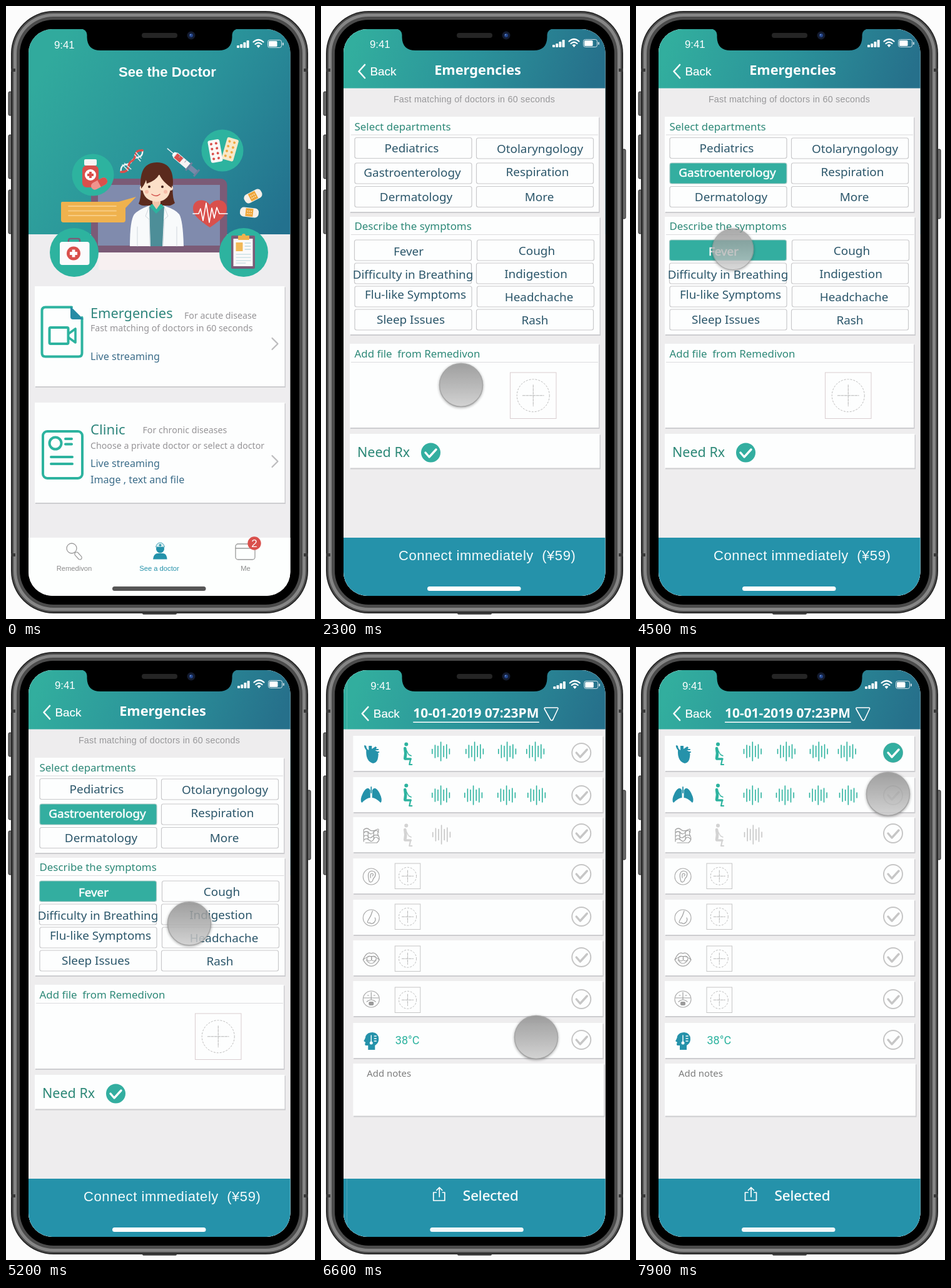
Recreate the animation shown at these times as an HTML page. Size 494x980 px, loop 8000 ms.

```html
<!DOCTYPE html>
<html lang="en">
<head>
<meta charset="utf-8">
<title>See the Doctor</title>
<style>
html, body { margin: 0; width: 100%; height: 100%; overflow: hidden; background: #fcfcfc; }
svg { display: block; width: 494px; height: 980px; }
text { font-family: "Noto Sans", "Open Sans", sans-serif; }
.ar { font-family: "Liberation Sans", Arial, sans-serif; }
.ro { font-family: Roboto, sans-serif; }
.on rect { fill: #33aea0; stroke: #a9c9c5; }
.on text { fill: #fff; stroke: #fff; stroke-width: .5; }
</style>
</head>
<body>
<svg id="stage" viewBox="0 0 494 980"></svg>
<script>
const TEAL = '#2db39f', BLUE = '#2592aa', RED = '#d9504c', PURPLE = '#7b5b77', GREY = '#c6c6c6';

// Markup helpers
const rect = (x, y, w, h, fill, rx = 0, more = '') =>
  `<rect x="${x}" y="${y}" width="${w}" height="${h}" rx="${rx}" fill="${fill}" ${more}/>`;
const circle = (x, y, r, fill, more = '') => `<circle cx="${x}" cy="${y}" r="${r}" fill="${fill}" ${more}/>`;
const shape = (d, fill, more = '') => `<path d="${d}" fill="${fill}" ${more}/>`;
const line = (d, color, width = 1, more = '') =>
  `<path d="${d}" fill="none" stroke="${color}" stroke-width="${width}" stroke-linecap="round" stroke-linejoin="round" ${more}/>`;
const text = (x, y, size, fill, str, more = '') =>
  `<text x="${x}" y="${y}" font-size="${size}" fill="${fill}" ${more}>${str}</text>`;
const group = (body, more = '') => `<g ${more}>${body}</g>`;
const at = (x, y, body, turn = 0, size = 1) => group(body, `transform="translate(${x} ${y}) rotate(${turn}) scale(${size})"`);
const MID = 'text-anchor="middle"', BOLD = 'font-weight="700"', ARIAL = 'class="ar"';

const card = (x, y, w, h) => rect(x + 1, y + 1.5, w + .5, h + .5, '#cdcdd0') + rect(x, y, w, h, '#fdfefe');
const cross = (x, y, r, color) => line(`M${x - r} ${y}h${2 * r}M${x} ${y - r}v${2 * r}`, color, r * .8, 'style="stroke-linecap:butt"');
const home = (x, color) => rect(x, 928, 149.5, 7, color, 3.5);

function status(x, y) {
  const bars = [4, 6, 9, 12].map((h, i) => rect(292 + i * 5.2, 67 - h, 4, h, '#fff', 1)).join('');
  const wifi = line('M318.5 57.5q8-7 16 0M321.5 61q5-4.5 10 0', '#fff', 2.2) + shape('M323.5 63.5q3-2.5 6 0l-3 3.5z', '#fff');
  const battery = rect(341.5, 54.5, 22, 12, 'none', 3, 'stroke="#d4e3ea"') + rect(343, 56, 13.5, 9, '#fff', 1.5) +
    rect(365, 58.5, 1.8, 4.5, '#d4e3ea', 1);
  return at(x, y, text(0, 68, 16.8, '#fff', '9:41', ARIAL) + bars + wifi + battery);
}

const back = (x, y) => line(`M${x + 10} ${y}l-9.5 10.5l9.5 10.5`, '#fff', 2.6) +
  text(x + 18.5, y + 17, 18.9, '#fff', 'Back', ARIAL + ' stroke="#fff" stroke-width=".2"');
const tick = (x, y, color) => line(`M${x - 8} ${y}l6 7l11-12`, color, 3.4);
const addBox = (x, y, size, r, color) => rect(x, y, size, size, 'none', 0, `stroke="${color}"`) +
  at(x + size / 2, y + size / 2, circle(0, 0, r, 'none', 'stroke="#bbb" stroke-dasharray="3 2"') +
    line(`M${-r * .65} 0h${r * 1.3}M0 ${-r * .65}v${r * 1.3}`, '#b5b5b5', 1, 'stroke-dasharray="4 1.5"'));

function doctor() {
  const hair = '#5b2a1d', skin = '#fcdfc8';
  return shape('M212 316Q217 305 215 284Q215 250 241 250Q267 250 267 282Q265 304 270 315Q264 320 258 319H224Q217 320 212 316Z', hair) +
    shape('M198 384Q198 343 205 333Q211 326 229 319H252Q271 325 277 333Q283 343 284 384Z', '#f8fafb') +
    shape('M229 320L231 384H250L253 320Z', '#4d8e98') + shape('M230 321L240 332L252 321L249 317H232Z', TEAL) +
    shape('M234 306H247V316L240.5 325L234 316Z', '#f3c6ab') +
    circle(218, 291, 4, skin) + circle(263, 291, 4, skin) +
    shape('M218 270H263V292Q261 312 240 313Q220 311 218 292Z', skin) +
    shape('M216 292Q221 287 224 278L225 284Q240 279 245 269Q250 281 265 291Q268 254 241 252Q214 254 216 292Z', hair) +
    circle(229, 289, 2, '#432019') + circle(250, 289, 2, '#432019') +
    circle(225, 297, 3, '#f6bda9') + circle(255, 297, 3, '#f6bda9') +
    line('M233 301q7 5 13 0', '#d2514b', 1.5) +
    line('M229 321l-6 15l6 5l1 43M253 321l6 15l-6 5l-2 43M210 353v31M273 353v31', '#cfd6dc', 1);
}

function hero() {
  const dots = color => [0, 1, 2, 3].map(r => [0, 1].map(c => circle(c * 8 - 4, r * 8 - 12, 2, color)).join('')).join('');
  const dna = line('M-15 15C-16 0-3 8 0 0S16-1 15-15', '#f4f7f8', 2) + line('M-15 15C0 16-8 3 0 0S1-16 15-15', RED, 3) +
    line('M-13 5l8 8M-10 3l9 8M4-9l8 9M6-12l7 8', '#e8eef0', 1.2);
  const syringe = line('M-31 0h12', '#e6eef2', 1.5) + shape('M-19-3l4-2v10l-4-2z', '#fff') + rect(-15, -5.5, 28, 11, '#f7f3f4', 1) +
    rect(-14, -4.5, 12, 9, RED) + line('M-8-5v4M-2-5v4M4-5v4', '#a8a6b5') + rect(12, -8, 3, 16, '#6f7f9e') +
    rect(15, -4, 14, 8, '#7789a8') + rect(28, -7, 3, 14, '#6f7f9e');
  const plaster = rect(-15, -7.5, 30, 15, '#f6efe7', 6) + rect(-6, -6.5, 12, 13, '#efa73c') +
    [-3, 0, 3].map(x => circle(x, -2, .8, '#fff') + circle(x, 2, .8, '#fff')).join('');
  return rect(148, 365, 200, 57, '#f7f0f1') + rect(136, 276, 217.5, 118, PURPLE, 10) + rect(147, 286, 195, 97, '#808bad') + doctor() +
    shape('M90 313H180L208 305L191 323V342Q191 346 187 346H92Q88 346 88 342V315Q88 313 90 313Z', '#efb24e') +
    line('M100 320h76M100 327.5h76M100 335h76', '#f8cc82', 1.8) +
    circle(139, 270, 33.5, TEAL) + rect(122, 255, 26, 35, RED, 7) + rect(125, 245, 20, 10, '#fbf4f3', 2) +
    circle(135, 270, 9, '#fff') + cross(135, 270, 5, RED) +
    at(149, 284, rect(-14, -6, 28, 12, '#f0938d', 6) + shape('M0-6H8a6 6 0 0 1 0 12H0z', RED), -28) +
    at(201, 248, dna, 0, 1.15) + at(282, 248, syringe, 40) +
    circle(346, 231, 33.5, TEAL) + at(358, 229, rect(-9, -18, 19, 36, '#f8e8c9', 3) + dots('#f0a942'), 16) +
    at(334, 232, rect(-9, -18, 19, 36, '#fbf7f6', 3) + dots(RED), -10) +
    at(395, 304, plaster, -28) + at(389, 330, plaster, 6) +
    shape('M326 354C307 341 299 334 299 323C299 309 318 306 326 318C334 306 353 309 353 323C353 334 345 341 326 354Z', RED) +
    line('M299 332h9l3-8l4 19l5-28l5 31l4-23l4 16l4-17l4 10h13', '#fff', 1.6) +
    circle(109, 394, 39, TEAL) + line('M100 379v-4q0-3 3-3h12q3 0 3 3v4', PURPLE, 2.5) + rect(86, 377, 47.5, 37, '#fbfbfc', 4) +
    circle(108, 395.5, 11, RED) + cross(108, 395.5, 6, '#fff') +
    circle(380, 394, 39, TEAL) + rect(360, 367, 38, 53, PURPLE, 2) + rect(363.5, 372, 31, 44, '#fbfafa') +
    rect(371, 367, 18, 7, '#efb24e', 1) + circle(380, 367, 3, '#efb24e') + rect(367.5, 378, 11, 14, '#f2b957') +
    line('M382 379h9M382 384h9M382 389h9', '#9ec8d0') + line('M368 397h23M368 402h23M368 407h23M368 411h15', '#b5d5db');
}

function doctorScreen() {
  const note = (x, y, s) => text(x, y, 14.2, '#969497', s);
  const link = (y, s) => text(135, y, 16.1, '#3b6c89', s);
  const chevron = y => line(`M425.5 ${y - 9}l9 9l-9 9`, '#bcbcbe', 2.2);
  const docIcon = line('M105 481.5H63Q57.5 481.5 57.5 487V555Q57.5 560.5 63 560.5H116Q121.5 560.5 121.5 555V498', TEAL, 4) +
    shape('M103 480L124 501H107Q103 501 103 497Z', '#268ba5') +
    rect(69.5, 514, 30, 26, 'none', 2, `stroke="${TEAL}" stroke-width="4"`) + line('M100 524l11-8v22l-11-8', TEAL, 3.6);
  const listIcon = rect(59, 680, 63, 75, 'none', 7, `stroke="${TEAL}" stroke-width="4"`) +
    circle(79, 699, 9.5, 'none', `stroke="${TEAL}" stroke-width="4"`) + line('M95 692h10M95 700.5h10M72 721h34M72 732h34', TEAL, 4);
  const tabs = rect(36, 850, 420, 94, '#fdfffe') +
    circle(105, 867, 8, 'none', 'stroke="#9a9a9a" stroke-width="1.3"') +
    at(115.5, 879, rect(-7, -3, 14, 6, 'none', 3, 'stroke="#9a9a9a" stroke-width="1.2"'), 48) +
    shape('M235 884.5Q236 875 243 875H250Q257 875 257.5 884.5Z', BLUE) + circle(246.5, 868, 6.5, BLUE) +
    shape('M239.5 865Q241 858 246.5 858T253.5 865Z', '#d8eef1', `stroke="${BLUE}" stroke-width=".8"`) + cross(246.5, 862, 2, BLUE) +
    rect(367, 860, 31, 25, 'none', 4, 'stroke="#9a9a9a" stroke-width="1.3"') + line('M367 867h31', '#9a9a9a', 1.3) +
    circle(397, 859, 10.7, RED) + text(397, 865, 17, '#fff', '2', MID + ' ' + ARIAL) +
    [['Remedivon', 109, '#8b8b8b'], ['See a doctor', 245, BLUE], ['Me', 383, '#8b8b8b']]
      .map(([s, x, c]) => text(x, 903, 11.2, c, s, MID + ' ' + ARIAL)).join('') + home(170, '#565656');
  return rect(36, 37, 420, 910, '#eeedef') + rect(36, 37, 420, 328, 'url(#tall)') + status(77, 0) +
    text(258, 113, 22.1, '#fff', 'See the Doctor', `${MID} ${BOLD} ${ARIAL}`) + hero() +
    card(46, 448, 399.5, 160) + docIcon + text(135, 499, 21.8, '#2f867d', 'Emergencies') + note(285, 500, 'For acute disease') +
    note(135, 520, 'Fast matching of doctors in 60 seconds') + link(566, 'Live streaming') + chevron(540) +
    card(46, 634, 399.5, 160) + listIcon + text(135, 685, 22.2, '#2f867d', 'Clinic') + note(218.5, 683, 'For chronic diseases') +
    note(135, 708, 'Choose a private doctor or select a doctor') + link(737, 'Live streaming') +
    link(763, 'Image , text and file') + chevron(728) + tabs;
}

const chrome = () => rect(36, 37, 420, 910, '#eeedee') + rect(36, 37, 420, 94.5, 'url(#short)') + rect(36, 850, 420, 97, BLUE);

function emergencyScreen() {
  // label, button x, button y, text centre, baseline
  const options = [
    ['Pediatrics', 54, 210.5, 145, 234], ['Otolaryngology', 248.5, 211, 350, 235],
    ['Gastroenterology', 54, 251, 146, 273], ['Respiration', 248.5, 251, 346, 272],
    ['Dermatology', 54, 288.5, 152, 312], ['More', 248.5, 288.5, 349, 312],
    ['Fever', 53.5, 374, 140, 399], ['Cough', 249.5, 374, 345, 398],
    ['Difficulty in Breathing', 53.5, 411, 147, 436], ['Indigestion', 248.5, 411, 343.5, 435],
    ['Flu-like Symptoms', 54, 448, 151, 468], ['Headchache', 249.5, 448, 348.5, 472],
    ['Sleep Issues', 54, 485, 143.5, 508], ['Rash', 248.5, 485, 342, 509]];
  const buttons = options.map(([s, x, y, cx, base]) => group(
    rect(x, y, 187, 33, '#fdfefe', 3, 'stroke="#c9c9cb" stroke-width="1.2"') + text(cx, base, 18.9, '#2b566a', s, MID),
    `id="${s.split(' ')[0]}"`)).join('');
  const section = (y, w, h, base, s, rule) => card(46, y, w, h) + text(53.5, base, 16.9, '#2c8877', s) + rect(48, rule, w - 3, 1, '#dcdcde');
  return chrome() + status(78, -1) + back(60, 94) + text(250.5, 110, 21.8, '#fff', 'Emergencies', `${MID} ${BOLD}`) +
    text(245, 154, 14.3, '#979799', 'Fast matching of doctors in 60 seconds', `${MID} ${ARIAL} letter-spacing=".25"`) +
    section(177, 398, 152, 199, 'Select departments', 205.5) + section(337, 399.5, 188, 358, 'Describe the symptoms', 365) + buttons +
    section(540, 398, 134, 562, 'Add file&nbsp; from Remedivon', 569) + addBox(302.5, 586, 73.5, 26, '#d9cdd0') +
    card(46, 684, 399.5, 54.5) + text(58, 721, 21.5, '#2c8877', 'Need Rx') + circle(175.5, 714, 15.5, '#33aea0') + tick(175, 714, '#fff') +
    text(124, 886, 22, '#f4fbfc', 'Connect immediately&nbsp; (¥59)', `${ARIAL} letter-spacing=".55"`) + home(170, '#fff');
}

function recordScreen() {
  const tops = [142, 208, 272, 338, 404, 469, 534, 601], checks = [169, 237, 298, 363, 431, 496, 563, 628];
  const wave = (x, y, color) => [7, 20, 17, 30, 17, 22, 8].map((h, i) => line(`M${x - 13.5 + i * 4.6} ${y - h / 2}v${h}`, color, 1.6)).join('');
  const sitter = (y, color) => at(132, y, circle(-1, -14.5, 3, color) + line('M-3-8Q-1 0-3 8', color, 4.6) + line('M-3 9H6', color, 3.4) +
    line('M6 9L4 18H8', color, 2.2) + line('M-2-7L3 2L7 4', color, 1.4));
  const ring = circle(0, 0, 13, 'none', 'stroke="#a5a5a5" stroke-width="1.1"'), ink = d => line(d, '#a0a0a0', 1.2);
  const lung = shape('M-1.5-8V4Q-7 4-15 12Q-19 8-13-4Q-6-16-1.5-8Z', BLUE);
  const icons = [
    shape('M-8-6Q-12-11-11-14L-8-13Q-8-8-4-6V-13H1V-8L7-12L9-10L6-6Q13-4 11 5Q10 14 3 15Q-9 12-8-6Z', BLUE) + line('M5-7h6M6-3h6', BLUE, 2),
    lung + group(lung, 'transform="scale(-1 1)"') + line('M0-13V-4', BLUE, 1.8),
    ink('M-12-9q5-4 9 0t14-1M-12-4q4-4 8 0t8-1t8 0M-12 2q4-4 7 0t7 0t10-1M-11 7q4-3 8 1t7-2t8 0M-9 12h17M-12-9v19M12-9q-3 6 0 11t-3 10M-5-6v13M4-7v14'),
    ring + ink('M-3 8Q-8-8 1-9Q9-8 6 0Q3 3 2 7Q0 10-3 8M-1 2Q-2-5 1-5Q5-4 2-1'),
    ring + ink('M2-11Q0-3-5 4Q-8 9-2 8Q1 11 5 7Q8 3 6 0'),
    ink('M-13 2Q-7-12 0-8Q7-12 13 2Q7 13 0 12Q-7 13-13 2ZM-13 2Q0-9 13 2M-8 2Q0 14 8 2') + circle(-3, 0, 4, 'none', 'stroke="#a0a0a0"') + circle(4, 0, 4, 'none', 'stroke="#a0a0a0"'),
    ring + ink('M-12-2H12M-7 4Q0-2 7 4M0-11V0M-6-6h2M4-6h2') + rect(-4, 4, 8, 6, '#9b9b9b', 2),
    shape('M-5 14V7H-9Q-11 6-9 2L-12 0Q-9-5-9-8Q-6-14 2-14Q12-13 12-3Q12 3 6 7V14Z', BLUE) + line('M0-9V2M5-8h3M5-4h3M5 0h3', '#fff', 1.4) + circle(0, 3, 2.5, '#fff')];
  const rows = tops.map((y, i) => card(46, y, 399, 56) + at(75, y + 29, icons[i]) +
    group(circle(411, checks[i], 15, 'none', `stroke="${GREY}" stroke-width="2"`) + tick(411, checks[i], GREY))).join('');
  const boxes = [346, 411, 478, 544].map(y => addBox(113, y, 40.5, 14, GREY)).join('');
  return chrome() + status(74, 0) + back(60, 96) + text(142, 113, 20.9, '#fff', '10-01-2019 07:23PM', BOLD) + rect(142, 119.5, 201.5, 1.5, '#fff') +
    line('M353 97h19q2 0 1.5 2l-8 17q-2 3-4 0l-9.5-17q-.5-2 1-2z', '#fff', 1.6) + rows + boxes + card(46, 666, 401, 83.5) +
    sitter(170, TEAL) + sitter(236, TEAL) + sitter(300, '#d3d3d3') +
    [186, 240, 292, 337].map(x => wave(x, 167, TEAL)).join('') + [186, 238, 291, 339].map(x => wave(x, 237, TEAL)).join('') + wave(187, 300, GREY) +
    text(113.5, 635, 18, TEAL, '38°C', 'class="ro"') + text(68, 687, 14.9, '#7d7d7d', 'Add notes') +
    group(circle(411, 169, 15.7, '#33aea0') + tick(411, 169, '#fff'), 'id="done"') +
    line('M179 872h-4.5v13h18v-13H189M184 879V864M179.5 868.5L184 864l4.5 4.5', '#fff', 1.7) +
    text(221.5, 885, 22.5, '#fff', 'Selected', 'stroke="#fff" stroke-width=".3"') + home(169, '#f0f8fa');
}

function phone() {
  const shell = (inset, fill) => rect(8 + inset, 8 + inset, 475 - 2 * inset, 963 - 2 * inset, fill, 68 - inset);
  const keys = [[4, 137, 38], [4, 206, 70], [4, 294, 70], [482, 229, 111]].map(([x, y, h]) => rect(x, y, 5, h, '#6d6d6d', 2, 'stroke="#222"')).join('');
  const bands = [[8, 100], [8, 875], [476, 100], [476, 875]].map(([x, y]) => rect(x, y, 7, 5, '#3a3a3a')).join('');
  return keys + rect(218, 969, 55, 4, '#555', 2) + shell(0, '#1c1c1c') + shell(1.5, '#4a4a4a') + shell(4, '#858585') +
    shell(9, '#4b4b4b') + bands + shell(14, '#000');
}

const notch = shape('M118 30V36Q129 37 129.5 46V50Q130 71 151 71H340Q361 71 361.5 50V46Q362 37 373 36V30Z', '#000') +
  rect(217, 43, 57, 8, '#252525', 4) + circle(296, 47, 6.5, '#141c30') + circle(296, 47, 3, '#23458c') + circle(295, 46, 1, '#7296cf');

const gradient = (id, box, stops) => `<linearGradient id="${id}" gradientUnits="userSpaceOnUse" ${box}>${
  stops.map((c, i) => `<stop offset="${i / (stops.length - 1)}" stop-color="${c}"/>`).join('')}</linearGradient>`;

document.getElementById('stage').innerHTML = `<defs>
  ${gradient('tall', 'x1="60" y1="100" x2="440" y2="350"', ['#31aa9d', '#2a939a', '#23718e'])}
  ${gradient('short', 'x1="60" y1="40" x2="420" y2="170"', ['#32ae9e', '#2b929a', '#26708b'])}
  ${gradient('knob', 'x1="0" y1="-35" x2="0" y2="35"', ['#909090', '#adadad', '#cdcdcd'])}
  <clipPath id="glass">${rect(36, 37, 418.5, 906, '#fff', 38)}</clipPath></defs>` + phone() +
  group(group(doctorScreen()) + group(emergencyScreen(), 'id="emergency"') + group(recordScreen(), 'id="record"') +
    group(circle(0, 0, 34.5, 'url(#knob)', 'stroke="#989898" stroke-width="1.5"'), 'id="cursor" style="filter:drop-shadow(0 1px 2px #0006)"'),
    'clip-path="url(#glass)"') + notch;

const $ = id => document.getElementById(id);
const LOOP = 8000, STEP = 100;
// time, x, y
const path = [[700, 392, 878], [800, 342, 877], [900, 290, 747], [1000, 252, 615], [1300, 241, 747], [2200, 241, 747], [2300, 224, 606],
  [2800, 167, 271], [3700, 167, 271], [4500, 155, 389], [4600, 155, 389], [5500, 362, 469], [5700, 362, 469], [5900, 344, 664],
  [6000, 344, 664], [6200, 344, 624], [6700, 344, 624], [7200, 412, 170], [7500, 412, 170], [7900, 403, 235]];
const presses = [[1600, 1900], [3300, 3500], [4500, 4700], [5500, 5700], [7300, 7500]];

function cursorAt(t) {
  const i = path.findIndex(k => k[0] >= t);
  if (i < 1) return path[i < 0 ? path.length - 1 : 0].slice(1);
  const [a, b] = [path[i - 1], path[i]], p = (t - a[0]) / (b[0] - a[0]);
  return [1, 2].map(n => a[n] + (b[n] - a[n]) * p);
}

// Screens glide in from the right over the one before.
function slide(el, t, start) {
  const p = Math.min(1, Math.max(0, (t - start) / 300));
  el.style.display = p ? '' : 'none';
  el.setAttribute('transform', `translate(${420 * (1 - p) ** 1.9} 0)`);
}

function draw() {
  const t = Math.floor((performance.now() - begin) % LOOP / STEP) * STEP;
  slide($('emergency'), t, 1630);
  slide($('record'), t, 6330);
  $('Gastroenterology').classList.toggle('on', t >= 3300);
  $('Fever').classList.toggle('on', t >= 4500);
  $('Headchache').classList.toggle('on', t >= 5600);
  $('done').style.display = t >= 7400 ? '' : 'none';
  const pressed = presses.some(([a, b]) => t >= a && t < b), cursor = $('cursor');
  cursor.style.display = t < path[0][0] ? 'none' : '';
  cursor.style.opacity = pressed ? .76 : .86;
  cursor.setAttribute('transform', `translate(${cursorAt(t)}) scale(${pressed ? .95 : 1})`);
  requestAnimationFrame(draw);
}
const begin = performance.now();
draw();
</script>
</body>
</html>
```
